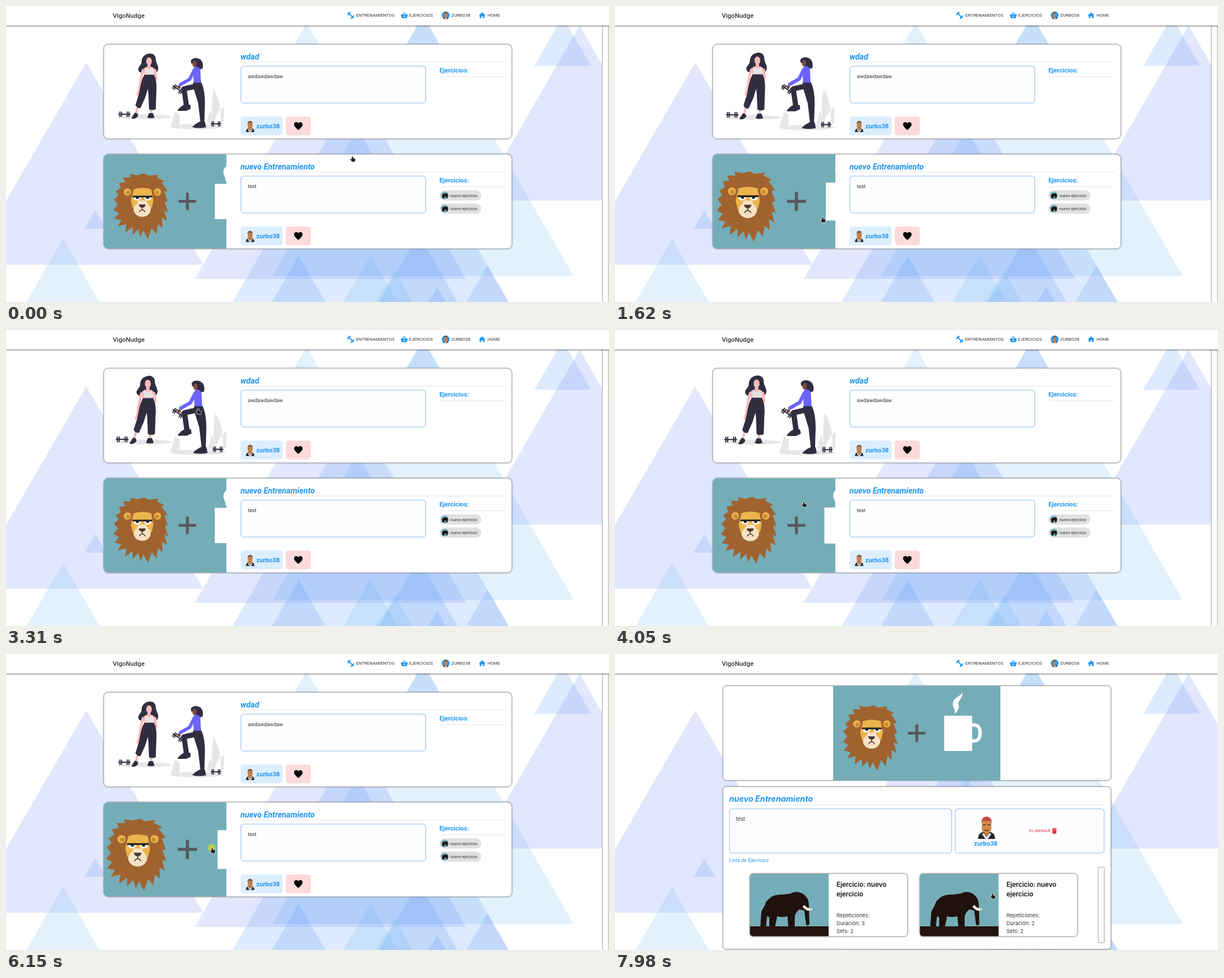
An HTML page for the animation above (8000 ms loop, 1067x525 px).

```html
<!DOCTYPE html>
<html lang="es">
<head>
<meta charset="utf-8">
<title>VigoNudge</title>
<style>
  html, body { margin: 0; width: 100%; height: 100%; overflow: hidden; background: #fff; }
  svg { display: block; width: 1067px; height: 525px; font: 9px Roboto, sans-serif; fill: #333; }
  .panel { fill: #fff; stroke: #a6a6aa; filter: drop-shadow(0 0 1px #0006); }
  .rule { stroke: #e5e5e8; fill: none; }
  .box { fill: #fdfdfe; stroke: #a3c8f0; stroke-width: 1.3; }
  .blue { fill: #2196f3; }
  .title { font: italic 700 14.2px Roboto, sans-serif; }
  .head { font: 700 11.2px Roboto, sans-serif; }
  .wide { font-family: Inter, sans-serif; font-size: 9.2px; }
  .bar { fill: #fdfdfd; stroke: #bbb; filter: drop-shadow(0 0 1px #0005); }
  .nav { font-size: 7.8px; }
  .line { fill: none; stroke-linecap: round; stroke-linejoin: round; }
  .skin { stroke: #ffb8b8; }
  .dark { fill: #2f2e41; }
</style>
</head>
<body>
<svg viewBox="0 0 1067 525">
  <defs>
    <clipPath id="thumb"><path d="M390 68H181a8 8 0 0 0-8 8V227a8 8 0 0 0 8 8H390z"/></clipPath>
    <clipPath id="round"><circle r="7"/></clipPath>

    <g id="avatar">
      <path d="M-15 20c0-9 5-12 11-13h8c6 1 11 4 11 13z" fill="#25262b"/>
      <path d="M-5 6h10l-1 6-4 4-4-4z" fill="#b97a45"/>
      <path d="M-6 9l6 8 6-8 2 3-6 8h-4l-6-8z" fill="#eee"/>
      <rect x="-8.500" y="-17" width="17" height="27" rx="8.500" fill="#d08b50"/>
      <path d="M-9-9c-1-14 19-14 18 0l-3-3H-6z" style="fill:var(--hair,#7a5a45)"/>
      <path d="M-6-5h4m4 0h4M-3 4q3 3 6 0" class="line" stroke="#4a2b18" stroke-width="1.500"/>
    </g>

    <g id="weights" class="line" stroke="#2f2e41">
      <path d="M-10 0H10" stroke-width="2"/>
      <path d="M-8-4V4M-5-4V4M5-4V4M8-4V4" stroke-width="2"/>
    </g>

    <g id="lion">
      <path fill="#74adb8" d="M386 56.500h296v168H386z"/>
      <path fill="#a06330" d="M432 92L446 94 458 91 465 95 483 93 480 98 494 105 488 107 499 122 493 123 499 140 494 142 500 160 493 157 498 175 489 170 490 188 482 181 479 199 471 188 464 207 456 192 451 204 447 190 437 200 437 186 424 196 426 181 411 185 417 174 405 171 413 161 403 156 411 146 404 137 412 130 407 123 416 117 413 108 424 106 420 98 434 98z"/>
      <g fill="#ecb44c">
        <circle cx="428" cy="124" r="6.500"/><circle cx="481" cy="124" r="6.500"/>
        <path d="M439 119q15-5 31 0l4 20-3 13q-17 9-34 0l-3-13z"/>
      </g>
      <g fill="#c98a35"><circle cx="429" cy="125" r="3.500"/><circle cx="480" cy="125" r="3.500"/></g>
      <path fill="#f5e2c5" d="M448 139h13l3 7c4 3 6 7 5 11-2 7-8 11-15 11s-13-4-15-11c-1-4 1-8 5-11z"/>
      <path fill="#fff" d="M438 133h14q-1 6-7 6t-7-6zM457 133h14q-1 6-7 6t-7-6z"/>
      <path fill="#222" d="M437 130.500h35v3h-35zM443 133h5v3h-5zM461 133h5v3h-5z"/>
      <path fill="#4c3a30" d="M448 146h12q0 5-6 6-6-1-6-6z"/>
      <path class="line" stroke="#4c3a30" stroke-width="1.500" d="M454 151v4M449 159q5-7 10 0"/>
      <path fill="#58595b" d="M518.500 138H531.500V125H536.500V138H549.500V143H536.500V156H531.500V143H518.500z"/>
      <g fill="#fff">
        <path d="M582.500 109.500h49.500v62.500h-49.500z"/>
        <path d="M615 69c-5 6-15 8-17 17-2 8 5 11 3 20 6-5 9-10 7-15-3-8 8-12 7-22z"/>
        <path d="M632 126q14-2 14 14t-14 14" fill="none" stroke="#fff" stroke-width="6"/>
      </g>
    </g>

    <g id="elephant">
      <path d="M268 440q6-11 20-13 12 0 22-2 12-6 22 0 10 6 11 18l1 36q-4 5-6 0l-3-24-9-2q-7 6-8 13v19h-11l-2-20q-10 3-18 0l-4 20h-10v-18l-4-2-2 20h-10l2-28z" fill="#1f110c"/>
      <path d="M269 438q-5 9-3 24" class="line" stroke="#1f110c" stroke-width="1.500"/>
      <path d="M335 445q5 7 15 7-3 4-10 3-6-3-8-7z" fill="#f6efe6"/>
    </g>

    <g id="exercise">
      <rect class="panel" x="238.500" y="389.500" width="279" height="111.500" rx="6"/>
      <path d="M378 390H244a5 5 0 0 0-5 5v100a5 5 0 0 0 5 5H378z" fill="#74adb8"/>
      <use href="#elephant"/>
      <path d="M239 483H378v17.500H244a5 5 0 0 1-5-5z" fill="#24140e"/>
      <g style="font:600 11.500px Inter,sans-serif" fill="#111">
        <text x="392" y="413">Ejercicio: nuevo</text><text x="392" y="430">ejercicio</text>
      </g>
      <g class="wide"><text x="392" y="466.500">Repeticiones:</text><text x="392" y="494.500">Sets: 2</text></g>
    </g>

    <g id="details">
      <path class="rule" d="M415 99.500H884M767 125.500H884"/>
      <rect class="box" x="415.700" y="106.600" width="327" height="65.500" rx="5"/>
      <text x="767" y="118" class="head blue">Ejercicios:</text>
      <rect x="415" y="196" width="74.500" height="33.500" rx="5" style="fill:var(--user,#dceefe)"/>
      <use href="#avatar" transform="translate(432 213.500) scale(.5)"/>
      <text x="443" y="217" class="head blue">zurbo38</text>
      <rect x="495" y="196" width="44.500" height="33.500" rx="5" style="fill:var(--like,#fddada)"/>
      <path d="M517.300 220l-1.500-1.300c-4-3.700-6-5.700-6-8.400 0-4.600 5-5.500 7.500-2.300 2.500-3.200 7.500-2.300 7.500 2.300 0 2.700-2 4.700-6 8.400z" fill="#000"/>
    </g>

    <g id="chip">
      <rect x="767" y="327" width="74" height="18" rx="9" fill="#e0e0e0"/>
      <circle cx="776.500" cy="336" r="6.800" fill="#74adb8"/>
      <path d="M772 339q-1-6 3-6 6-2 7 2l-1 6h-2v-3h-3v3h-4z" fill="#1f110c"/>
      <text x="786" y="338.700" font-size="7.200">nuevo ejercicio</text>
    </g>
  </defs>

  <g id="backdrop"></g>

  <g id="listPage">
    <rect class="panel" x="173" y="68" width="722" height="167.500" rx="8"/>
    <g clip-path="url(#thumb)"><g id="athletes">
      <g fill="#e6e6e6">
        <ellipse cx="246" cy="196.500" rx="48" ry="4"/><ellipse cx="338" cy="214" rx="47" ry="4.500"/>
        <path d="M299 187l8 5v22h-16zM367 148c11 14 14 36 13 60h-13c-4-20-3-40 0-60zM386 178c-10 8-16 18-18 30h16c2-10 3-20 2-30zM361 184c4 8 5 16 4 24h-10z"/>
      </g>
      <use href="#weights" x="209.500" y="192"/>
      <use href="#weights" transform="translate(371.500 209) scale(.85 1)"/>
      <path class="dark" d="M253 84.500c8-1 12 4 12 10 0 7 6 12 4 19-1 4-4 5-6 4l-4-9h-12l-5 8c-3 3-7 1-8-3-1-6 6-8 6-15 0-7 5-13 13-14z"/>
      <g class="line skin" stroke-width="4">
        <path d="M242 114L238 132 236 148 233 157M264 114L266 128 259 134M233 178L230 192M257 182V192"/>
      </g>
      <path fill="#ffb8b8" d="M241 113q4-4 9-5v-4h6v4q5 1 9 5l-3 12h-17z"/>
      <ellipse cx="253" cy="98" rx="5" ry="7" fill="#ffb8b8"/>
      <path fill="#e4e4e6" d="M246 109q7 5 14 0l2 12h-16z"/>
      <path class="dark" d="M245 122h17c4 8 5 18 4 30l-1 31q-6 3-12 0l-1-28-1-8-5 16-8 18q-6 1-9-5l6-19c3-14 4-26 10-35z"/>
      <path class="dark" d="M228 189l5 2 1 4q-6 7-12 4zM253 190h7l3 8q-7 2-13 0z"/>

      <path class="dark" d="M327 97c3-6 13-6 18-1 4 4 4 11 3 15-5 2-9 1-12 0l-2-8-6-1z"/>
      <ellipse cx="333.500" cy="102.500" rx="3.700" ry="5.500" fill="#7d4b40"/>
      <path d="M333 108q10-2 11 7l1 22h-13l-1-20z" fill="#6c63ff"/>
      <path class="line" d="M333 114L325 130 309 139" stroke="#6c63ff" stroke-width="6"/>
      <path class="dark" d="M331 136h15q6 14 6 36l-1 34h-7l-4-34-8-26z"/>
      <path class="line" d="M337 142L315 147 319 175" stroke="#2f2e41" stroke-width="9"/>
      <path class="dark" d="M304 184q5-6 11-9h11l1 7-8 4h-15zM330 214q6-6 13-9h9l2 10q-12 3-24 0z"/>
      <circle cx="306" cy="144" r="3" fill="#7d4b40"/>
      <use href="#weights" transform="translate(304 147.500) rotate(35)"/>
    </g></g>
    <use href="#details"/>
    <text x="415" y="94.500" class="title blue">wdad</text>
    <text x="428" y="128">awdawdawdaw</text>

    <g transform="translate(0 195)">
      <rect class="panel" x="173" y="68" width="722" height="167.500" rx="8"/>
      <g clip-path="url(#thumb)"><g id="thumbLion"><use href="#lion" transform="translate(-213 11)"/></g></g>
      <use href="#details" id="secondDetails"/>
      <text x="415" y="94.500" class="title blue">nuevo Entrenamiento</text>
      <text x="428" y="128">test</text>
    </g>
    <use href="#chip"/><use href="#chip" y="23.300"/>
    <rect class="bar" x="1055.500" y="30" width="10.500" height="510"/>
  </g>

  <g id="detailPage">
    <rect class="panel" x="191" y="56.500" width="686.500" height="167.500" rx="6"/>
    <use href="#lion"/>
    <rect class="panel" x="191" y="235.500" width="686.500" height="288" rx="6"/>
    <text x="202" y="262" class="blue" style="font:italic 700 14.200px Inter,sans-serif">nuevo Entrenamiento</text>
    <path class="rule" d="M202 267.500H866"/>
    <rect class="box" x="202.600" y="274.600" width="393" height="78.500" rx="5"/>
    <rect class="box" x="602" y="274.600" width="263.500" height="78.500" rx="5"/>
    <text x="214" y="296" class="wide">test</text>
    <use href="#avatar" x="657.500" y="308" style="--hair:#c8473f"/>
    <text x="656" y="340" class="head blue" text-anchor="middle">zurbo38</text>
    <g fill="#dc3545">
      <text x="733" y="316" font-size="7.800" letter-spacing=".25">ELIMINAR</text>
      <path d="M773.500 309.500h2.500l.6-.8h2l.6.800h2.300v1.400h-8zM774 311.500h7v6q0 1.300-1.300 1.300h-4.400q-1.300 0-1.300-1.300z"/>
    </g>
    <text x="202" y="369" class="blue" font-style="italic">Lista de Ejercicios</text>
    <use href="#exercise"/><use href="#exercise" x="300.700"/>
    <text x="392" y="480.500" class="wide">Duración: 3</text>
    <text x="692.700" y="480.500" class="wide">Duración: 2</text>
    <rect class="bar" x="855.500" y="378.500" width="10" height="133"/>
  </g>

  <path d="M-5-5H1072V34.500H-5z" fill="#fff" style="filter:drop-shadow(0 1px 1.500px #0009)"/>
  <text x="189" y="20.700" style="font:500 11.300px Roboto,sans-serif">VigoNudge</text>
  <g class="nav">
    <g transform="translate(610 16.500) rotate(45)" class="line" stroke="#2196f3">
      <path d="M-6 0H6" stroke-width="2"/><path d="M-4.500-3V3M4.500-3V3" stroke-width="2.200"/>
    </g>
    <text x="619.500" y="19.300">ENTRENAMIENTOS</text>
    <path d="M698.500 15h12.500l-1.700 6.500h-9zM701 15l3.700-4.500 3.700 4.500" class="blue"/>
    <path d="M702.500 15l2.200-2.700 2.200 2.700zM704.700 16.700a1.300 1.300 0 1 0 .1 0z" fill="#fff"/>
    <text x="713" y="19.300">EJERCICIOS</text>
    <g transform="translate(778 16.500)" clip-path="url(#round)">
      <circle r="7" class="blue"/><use href="#avatar" transform="translate(0 .5) scale(.34)"/>
    </g>
    <text x="788" y="19.300">ZURBO38</text>
    <path d="M842.500 11.300l6 5.300h-1.700v4.700h-3v-3.300h-2.600v3.300h-3v-4.700h-1.700z" class="blue"/>
    <text x="852" y="19.300">HOME</text>
  </g>

  <circle id="click" cx="364" cy="344" r="7" fill="#bdd03c" opacity=".9"/>
  <path id="cursor" d="M-1-5c-.9 0-1.200.5-1.200 1v4l-1.400-.9c-1 0-1.300.8-.7 1.500l2.700 3.600h4.600c.9-1.500 1.200-2.800 1-4.500-.2-1-1-1.200-3.800-1.700v-2c0-.6-.3-1-1.200-1z" fill="#222" stroke="#fff" stroke-width="1.400" paint-order="stroke"/>
</svg>
<script>
const LOOP = 8000, CLICK = 6080, PAGE_CHANGE = 6400, FADE = 500;
const el = id => document.getElementById(id);

// Equilateral triangles: apex x, apex y, base y, tint
const lavender = 'rgba(85,115,245,.17)', sky = 'rgba(100,180,240,.19)', azure = 'rgba(80,145,245,.19)';
const triangles = [
  [142, 100, 459, lavender], [101, 413, 560, sky], [158, 362, 395, azure],
  [1015, 35, 345, lavender], [985, 19, 106, azure], [532, 30, 180, sky],
  [738, 17, 479, sky], [738, 17, 130, azure], [574, 68, 484, lavender],
  [600, 180, 560, azure], [775, 327, 560, azure], [518, 443, 560, azure],
  [645, 442, 560, sky], [688, 470, 560, sky], [763, 498, 560, azure], [852, 460, 560, azure]
];
el('backdrop').innerHTML = triangles.map(([x, top, base, tint]) => {
  const half = (base - top) * 0.577;
  return `<path d="M${x} ${top}L${x + half} ${base}H${x - half}z" fill="${tint}"/>`;
}).join('');

// Pointer stops: time, x, y
const stops = [
  [320, 614, 272], [560, 495, 324], [800, 370, 215], [1080, 331, 171], [1200, 328, 190],
  [1500, 330, 350], [1660, 375, 385], [1880, 474, 411], [2050, 455, 411], [2300, 455, 411],
  [2550, 512, 408], [2780, 539, 364], [3080, 395, 200], [3310, 341, 145], [3650, 341, 148],
  [4050, 335, 310], [4420, 350, 345], [4600, 400, 342], [4810, 781, 336], [5270, 790, 358],
  [5480, 625, 388], [5660, 390, 352], [6000, 366, 349], [6420, 366, 349], [6890, 462, 217],
  [6960, 462, 217], [7160, 532, 186], [7370, 532, 186], [7700, 675, 330], [7980, 669, 430]
];
const clamp = v => Math.min(1, Math.max(0, v));
const smooth = v => v * v * (3 - 2 * v);

function pointerAt(t) {
  const i = stops.findIndex(s => s[0] > t);
  if (i < 0) return stops[stops.length - 1].slice(1);
  if (i === 0) return stops[0].slice(1);
  const [t0, x0, y0] = stops[i - 1], [t1, x1, y1] = stops[i];
  const k = smooth((t - t0) / (t1 - t0));
  return [x0 + (x1 - x0) * k, y0 + (y1 - y0) * k];
}

// Hover zoom up to 110 %, easing in and out of each [enter, leave] span
function zoomAt(t, spans) {
  return 1 + 0.1 * Math.max(...spans.map(([enter, leave]) =>
    smooth(clamp(Math.min((t - enter) / FADE, 1 - (t - leave) / FADE)))));
}
const zoom = (id, x, y, s) =>
  el(id).setAttribute('transform', `translate(${x} ${y}) scale(${s}) translate(${-x} ${-y})`);
const show = (id, on) => el(id).setAttribute('display', on ? 'inline' : 'none');

function draw() {
  const t = performance.now() % LOOP;
  const [x, y] = pointerAt(t);
  const inRow = y > 391 && y < 425;
  el('cursor').setAttribute('transform', `translate(${x} ${y})`);
  zoom('athletes', 297, 151.5, zoomAt(t, [[765, 1280], [3075, 3820]]));
  zoom('thumbLion', 321, 151.5, zoomAt(t, [[1280, 1675], [3900, 4600], [5640, 7000]]));
  const details = el('secondDetails').style;
  details.setProperty('--user', inRow && x > 415 && x < 490 ? '#b3dafc' : '#dceefe');
  details.setProperty('--like', inRow && x > 495 && x < 540 ? '#fbb9b9' : '#fddada');
  show('listPage', t < PAGE_CHANGE);
  show('detailPage', t >= PAGE_CHANGE);
  show('click', t >= CLICK && t < PAGE_CHANGE);
  requestAnimationFrame(draw);
}
draw();
</script>
</body>
</html>
```
